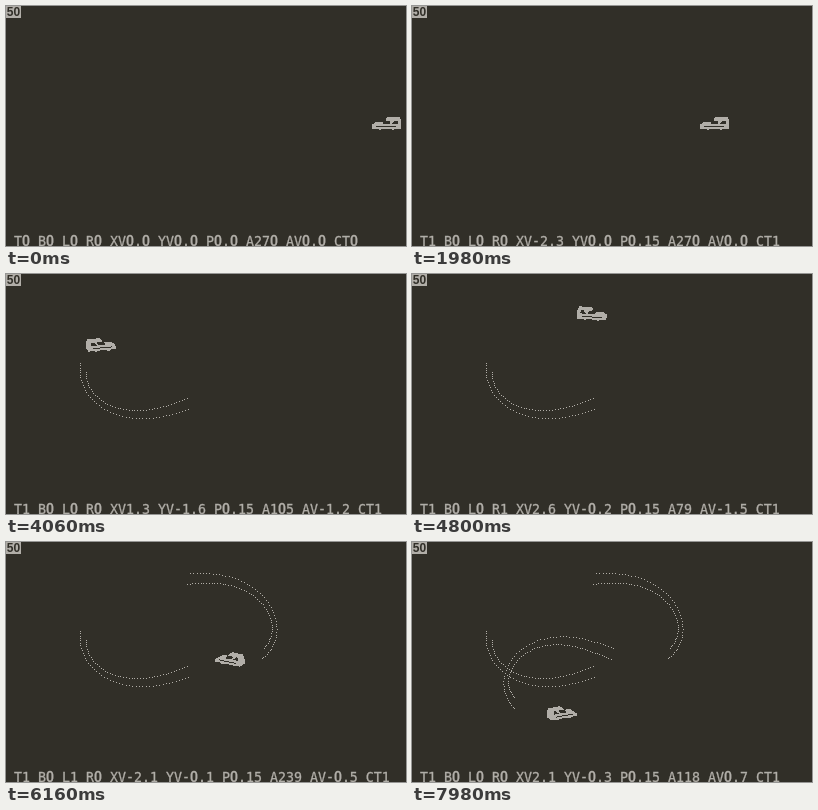
Write an HTML page with a canvas that moves like this. It is 400 by 240 pixels and loops after 8000 ms.

```html
<!DOCTYPE html>
<html lang="en">
<head>
<meta charset="utf-8">
<title>Drift test</title>
<style>
  html, body { margin: 0; width: 400px; height: 240px; overflow: hidden; background: #312f28; }
  #stage { position: absolute; left: 0; top: 0; width: 400px; height: 240px; overflow: hidden; }
  canvas { display: block; }
  #hud { position: absolute; left: 8px; top: 227px; margin: 0; color: #b1aea8; white-space: pre;
    font: 13.29px/16px "DejaVu Sans Mono", monospace; -webkit-text-stroke: 0.3px #b1aea8; }
  #hud b { display: inline-block; width: 8px; text-align: center; font: 500 14px/16px Roboto, sans-serif; }
  #fps { position: absolute; left: 0; top: 0; width: 15px; height: 12px; background: #b1aea8; color: #312f28;
    font: bold 12px/12px "Liberation Sans", sans-serif; text-align: center; }
</style>
</head>
<body>
<div id="stage">
  <canvas width="400" height="240"></canvas>
  <div id="fps">50</div>
  <pre id="hud"></pre>
</div>
<script>
const STEP = 20, STEPS = 400;
const LIGHT = '#b1aea8', DARK = '#312f28';
const MAX_POWER = 0.152, POWER_UP = 0.002, DRAG = 0.95;
const TURN = 0.004 * 180 / Math.PI, SKID = 2.1;
const REAR = 8, HALF = 5.5;

// key presses as [first step, last step]
const THROTTLE = [[22, 399]];
const LEFT = [[110, 117], [306, 365]];
const RIGHT = [[131, 179], [234, 282]];
const held = (spans, s) => spans.some(([a, b]) => s >= a && s <= b) ? 1 : 0;

// the car as stacked slices: height, front, back, half width, lit
const SLICES = [
  [0, -8, -6, 5.5, 1], [0, 5, 7, 5.5, 1],
  [1, -15, 14, 5.5, 1], [2, -15, 14, 5.5, 1],
  [3, -13, 12, 5.5, 0], [3, -15, -11, 5.5, 1], [3, 9, 14, 5.5, 1],
  [4, -13, 14, 5.5, 1], [5, -12, 14, 5.5, 1],
  [6, -4, 13, 4.5, 0], [7, -3, 13, 4.5, 0], [8, -2, 13, 4.5, 0],
  [6, 3, 5, 4.5, 1], [7, 4, 6, 4.5, 1], [8, 5, 7, 4.5, 1],
  [6, 11, 14, 4.5, 1], [7, 11, 14, 4.5, 1], [8, 11, 14, 4.5, 1],
  [9, -1, 13, 4, 1], [10, 0, 13, 4, 1]
];
const TILT = 0.35, GROUND = 5;

function simulate() {
  const log = [];
  let x = 381, y = 117, vx = 0, vy = 0, angle = 270, spin = 0, power = 0;
  for (let s = 0; s < STEPS; s++) {
    const t = held(THROTTLE, s), l = held(LEFT, s), r = held(RIGHT, s);
    power = t ? Math.min(MAX_POWER, power + POWER_UP) : 0;
    spin += (l - r) * TURN;
    angle += spin;
    const rad = angle * Math.PI / 180, sin = Math.sin(rad), cos = Math.cos(rad);
    vx += sin * power;
    vy += cos * power;
    x += vx;
    y += vy;
    const marks = [];
    if (Math.abs(spin) > SKID) {
      for (const side of [-HALF, HALF]) {
        marks.push([x - sin * REAR + cos * side, y - cos * REAR - sin * side]);
      }
    }
    vx *= DRAG;
    vy *= DRAG;
    spin *= DRAG;
    log.push({ t, l, r, x, y, vx, vy, angle, spin, power, marks });
  }
  return log;
}

const log = simulate();
const ctx = document.querySelector('canvas').getContext('2d');
const hud = document.getElementById('hud');
const cut = (v, n) => Math.floor(v * n + 1e-6) / n;
const one = v => cut(v, 10).toFixed(1);
const two = v => cut(v, 100) ? String(cut(v, 100)) : '0.0';
const dot = (x, y) => ctx.fillRect(Math.round(x), Math.round(y), 1, 1);

function drawCar(c) {
  const turn = (270 - c.angle) * Math.PI / 180, cos = Math.cos(turn), sin = Math.sin(turn);
  const cx = Math.round(c.x), cy = Math.round(c.y) + GROUND;
  for (const [z, front, back, half, lit] of SLICES) {
    ctx.fillStyle = lit ? LIGHT : DARK;
    for (let y = -7; y <= 7; y++) {
      for (let x = -17; x <= 17; x++) {
        const g = y / TILT, u = x * cos + g * sin, v = g * cos - x * sin;
        if (u >= front - 0.01 && u < back && Math.abs(v) <= half) dot(cx + x, cy + y - z);
      }
    }
  }
}

function draw(s) {
  const c = log[s];
  ctx.clearRect(0, 0, 400, 240);
  ctx.fillStyle = LIGHT;
  for (let i = 0; i <= s; i++) log[i].marks.forEach(m => dot(...m));
  drawCar(c);
  const deg = Math.floor((c.angle % 360 + 360) % 360 + 1e-6);
  const text = `T${c.t} B0 L${c.l} R${c.r} XV${one(c.vx)} YV${one(c.vy)} ` +
    `P${two(c.power)} A${deg} AV${one(c.spin)} CT${c.t}`;
  hud.innerHTML = text.replace(/0/g, '<b>0</b>');
}

let shown = -1;
const start = performance.now();
function tick(now) {
  const s = Math.floor(Math.max(0, now - start) / STEP) % STEPS;
  if (s !== shown) draw(shown = s);
  requestAnimationFrame(tick);
}
draw(0);
requestAnimationFrame(tick);
</script>
</body>
</html>
```
